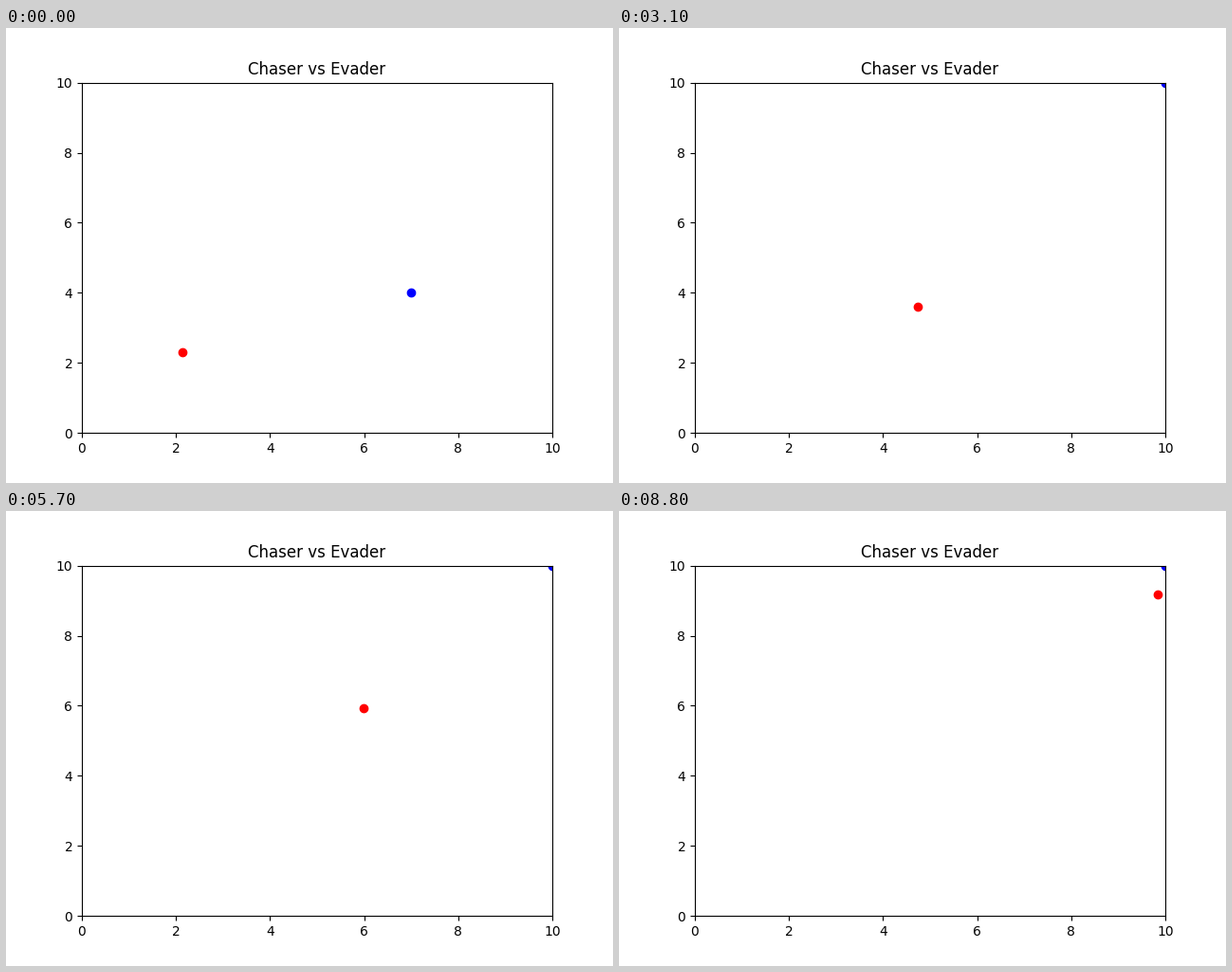
Recreate the animation shown at these times as a matplotlib script. Size 640 px wide and 480 px high, loop 8850 ms.

```python
import numpy as np
import matplotlib.pyplot as plt
from matplotlib.animation import FuncAnimation

FRAMES = 177
INTERVAL = 50
SIZE = 10
EVADER_SPEED = 0.3
JITTER = 0.05

# Chaser waypoints: step -> (x, y)
WAYPOINTS = {
    0: (2.137, 2.305), 6: (2.1, 2.33), 23: (3.327, 2.36), 62: (4.738, 3.604),
    72: (4.82, 4.1), 92: (5.121, 4.443), 114: (5.988, 5.931),
    126: (6.774, 7.15), 150: (8.73, 7.636), 176: (9.839, 9.177),
}


def chaser_path():
    """Random walk pinned to the waypoints."""
    rng = np.random.default_rng(4)
    steps = np.arange(FRAMES)
    keys = list(WAYPOINTS)
    walk = rng.normal(0, JITTER, (FRAMES, 2)).cumsum(axis=0)
    offset = np.array(list(WAYPOINTS.values())) - walk[keys]
    drift = [np.interp(steps, keys, column) for column in offset.T]
    return walk + np.column_stack(drift)


def evader_path(chaser):
    """Run straight away from the chaser, held inside the arena."""
    path = [np.array([7.0, 4.0])]
    for pos in chaser[:-1]:
        away = path[-1] - pos
        step = EVADER_SPEED * away / np.linalg.norm(away)
        path.append(np.clip(path[-1] + step, 0, SIZE))
    return np.array(path)


chaser = chaser_path()
evader = evader_path(chaser)

fig, ax = plt.subplots(figsize=(6.4, 4.8), dpi=100)
ax.set_xlim(0, SIZE)
ax.set_ylim(0, SIZE)
ax.set_title("Chaser vs Evader")
chaser_dot, = ax.plot([], [], "ro")
evader_dot, = ax.plot([], [], "bo")


def update(i):
    chaser_dot.set_data(chaser[i:i + 1].T)
    evader_dot.set_data(evader[i:i + 1].T)
    return chaser_dot, evader_dot


anim = FuncAnimation(fig, update, frames=FRAMES, interval=INTERVAL,
                     repeat=True, repeat_delay=0)
plt.show()
```
